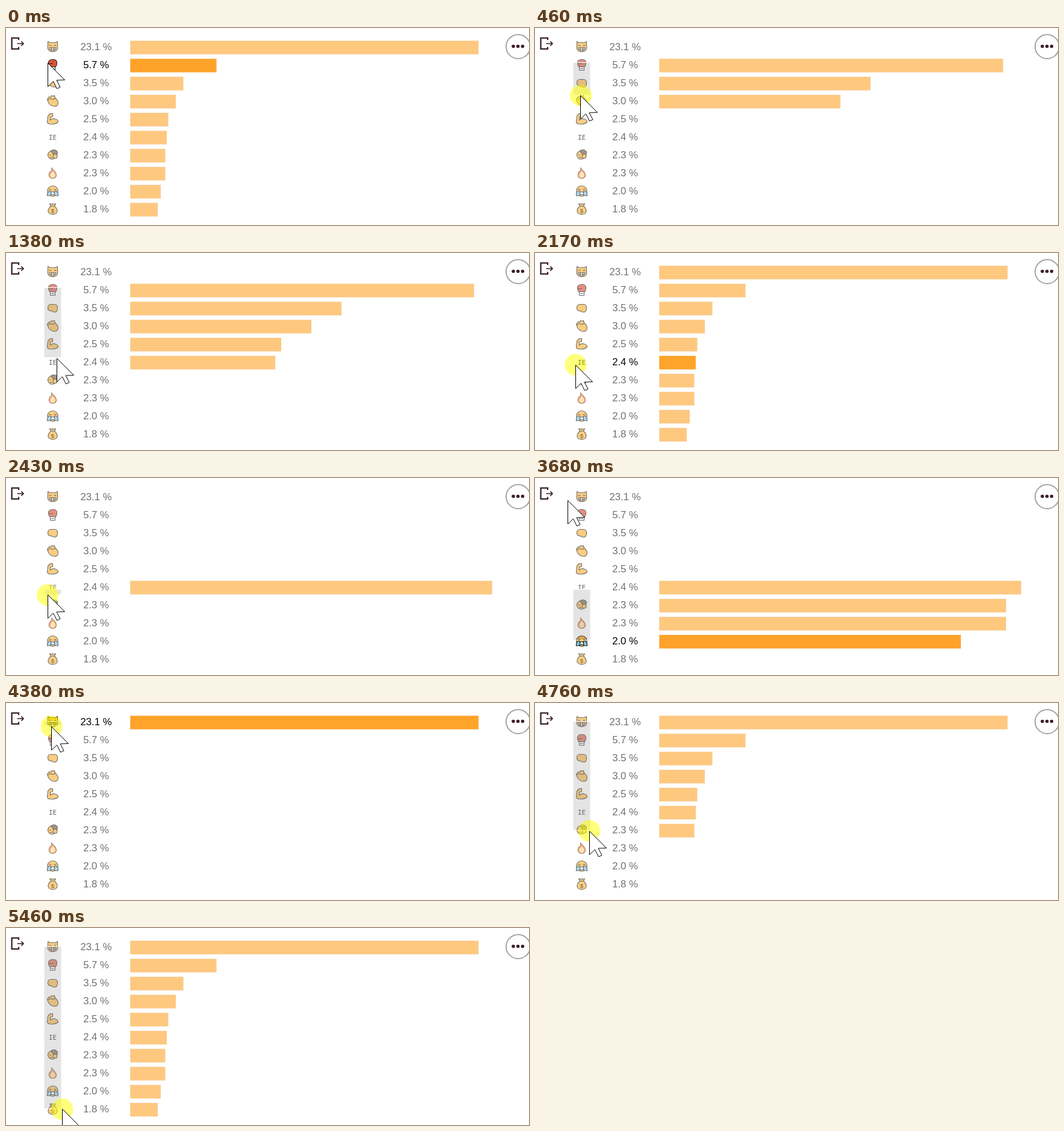
An HTML page that plays this animation: 868 by 328 pixels, repeating every 5540 ms.

```html
<!DOCTYPE html>
<html lang="en">
<head>
<meta charset="utf-8">
<title>Emoji share chart</title>
<style>
  html, body { margin: 0; width: 100%; height: 100%; overflow: hidden; background: #fff; }
  svg { display: block; width: 868px; height: 328px; }
  .bar { fill: #ffc87f; stroke: #f6d2a0; }
  .label { font: 16.7px "Liberation Sans", Arial, sans-serif; text-anchor: middle; fill: #707070; }
  .icon { opacity: .65; stroke: #222; stroke-width: 1.1; fill: none; stroke-linejoin: round; stroke-linecap: round; }
  .icon text { stroke: none; fill: #111; text-anchor: middle; }
  .code { font: 11px "DejaVu Sans Mono", monospace; }
  .coin { font: 9.5px "Liberation Sans", sans-serif; }
  .on .bar { fill: #ffa32a; stroke: #fbb558; }
  .on .label { fill: #000; }
  .on .icon { opacity: 1; }
  .icon .skin { fill: #fab33c; }
  .icon .white { fill: #fff; }
  .icon .red { fill: #d8553a; }
  .icon .blue { fill: #7cc6ec; }
  .icon .hair { fill: #7a5a3c; }
  .icon .fire { fill: #f0803a; stroke: #7a4a30; }
  .icon .glow { fill: #ffd98a; stroke: none; }
  #brush { fill: #777; fill-opacity: .2; stroke: #fff; }
  #press { fill: #ff0; fill-opacity: .52; }
  .ui { stroke: #3b2125; fill: none; }
  .dots { stroke: #3b2125; stroke-width: 5.6; stroke-linecap: round; stroke-dasharray: 0 7.7; }
</style>
</head>
<body>
<svg viewBox="0 0 868 328">
  <g class="ui">
    <path d="M21 20V16.6H9.6V34.9H21V31.5" stroke-width="2.3"/>
    <path d="M18.5 26H29M25.3 22.3L29 26L25.3 29.7" stroke-width="1.7"/>
  </g>
  <circle cx="850" cy="31" r="20" fill="#fff" stroke="#a5a5a5" stroke-width="2"/>
  <path class="dots" d="M842 30.5H858"/>
  <g id="rows"></g>
  <rect id="brush" x="63" width="29"/>
  <circle id="press" r="18"/>
  <path id="cursor" d="M0 0V39L9 30.5L15 42.5L20.5 40L14.5 28.5L28 28Z" fill="#fff" stroke="#000"/>
</svg>
<script>
const LOOP = 5540, STEP = 76, PITCH = 30, MID = 31.5;
const $ = id => document.getElementById(id);
const shape = (cls, d) => `<path class="${cls}" d="${d}"/>`;
const disc = (cls, r, x = 0, y = 0) => `<circle class="${cls}" r="${r}" cx="${x}" cy="${y}"/>`;
const eyes = shape('', 'M-5.5-2q1.5-2 3 0M2.5-2q1.5-2 3 0');
const grin = shape('white', 'M-5.5 1h11q-.5 5.5-5.5 5.5t-5.5-5.5z');

const icons = {
  cat: shape('skin', 'M-8-3V-9l4 2q4-1 8 0l4-2v6q2 11-8 11t-8-11z') + eyes + grin +
    shape('', 'M-5 3.5H5M-2 1v5M2 1v5'),
  glove: shape('white', 'M-4 3h8v6h-8z') +
    shape('red', 'M-5 3q-2-2-2-6 0-6 6-6h3q5 0 5 6 0 4-2 6z') +
    shape('', 'M-6-2h6M-2 6h4'),
  fist: shape('skin', 'M-8 0q0-6 5-6h6q5 0 5 6t-4 7q-4 0-6-2-6 0-6-5z'),
  clap: shape('skin', 'M-9-3l3-4 2 1 2-3 2 1 3-1 1 4q5 4 5 8 0 6-6 6-6 0-10-6z') +
    shape('', 'M-8-2q4-3 7-1 4 1 5-2'),
  arm: shape('skin', 'M-8-5l4-4h4v5l-4 1v5q4-4 8-2 5 1 5 5-4 4-12 3.500-6 0-6-4z'),
  code: '<text class="code" y="4.8">IE</text>',
  head: disc('skin', 7, -1) + shape('hair', 'M-3-7q7-4 11 2l-1 6-5-1z') + disc('skin', 3.5, 4, 2) +
    shape('', 'M-5 0h2M-4 4h3'),
  flame: shape('fire', 'M-2-9q2 3 5 6 4 4 3 8-2 4-6 4t-6-4q-1-5 3-8 2-2 1-6z') +
    shape('glow', 'M0-3q5 4 4 8-2 3-4 3t-4-3q0-4 4-8z'),
  tears: disc('skin', 8.8) + eyes +
    shape('blue', 'M-6 0h3v7l-6 1v-4zM6 0h-3v7l6 1v-4z') + shape('white', 'M-3 6q0-5 3-5t3 5z'),
  bag: shape('skin', 'M-3-5l-2-4 3 1 2-1 2 1 3-1-2 4q5 4 4.500 9-1 5-7.500 5t-7.500-5q-.5-5 4.500-9zh6') +
    '<text class="coin" y="6.500">$</text>'
};
const shares = [23.1, 5.7, 3.5, 3.0, 2.5, 2.4, 2.3, 2.3, 2.0, 1.8];

$('rows').innerHTML = Object.values(icons).map((icon, i) => `<g transform="translate(0 ${PITCH * i})">
  <rect class="bar" x="206.5" y="21.5" height="22"/>
  <text class="label" x="149.5" y="37">${shares[i].toFixed(1)} %</text>
  <g class="icon" transform="translate(77.5 ${MID})">${icon}</g></g>`).join('');
const rows = [...$('rows').children];

const home = [69, 58];
// Each move: start, end, x, y to reach
const moves = [
  [82, 720, 84, 175], [1710, 1862, 67.5, 186], [2246, 3000, 83, 271], [3280, 3660, 54.5, 37],
  [3910, 4138, 69, 31], [4214, 4366, 75.5, 39], [4366, 4596, 90, 213], [5080, 5580, 94, 317]
];
// Each drag: press, release
const drags = [[90, 1380], [2170, 3130], [4214, LOOP]];

// Eased pointer travel, sampled once per STEP
function pointer(t) {
  let [x, y] = home;
  for (const [from, to, nx, ny] of moves) {
    if (t < from) break;
    const u = Math.min(1, Math.floor((t - from) / STEP) * STEP / (to - from));
    const k = u * u * (3 - 2 * u);
    x += (nx - x) * k;
    y += (ny - y) * k;
  }
  return [x, y];
}

function rowAt([x, y]) {
  const i = Math.round((y - MID) / PITCH);
  const reach = i === 5 ? 6 : 9; // the text code is lower than the icons
  return x > 67 && x < 88 && Math.abs(y - MID - PITCH * i) <= reach ? i : -1;
}

// Round the axis end up to a clean multiple
function axisEnd(max) {
  const step = max > 10 ? 2 : max > 5 ? 1 : max > 2.5 ? .5 : .2;
  return Math.ceil(max / step - 1e-6) * step;
}

function draw(t) {
  const [x, y] = pointer(t);
  const [press, release] = drags.findLast(d => d[0] <= t) || [t, t];
  const held = t < release;
  const top = pointer(press)[1] - .5;
  const end = pointer(Math.min(t, release))[1] - 1;
  const brushed = end - top >= 1;
  const shown = shares.map((_, i) => !brushed || (end >= 20 + PITCH * i && top <= 45 + PITCH * i));
  const scale = 600 / axisEnd(Math.max(...shares.filter((_, i) => shown[i])));

  // After a release the last row stays lit until another is entered
  let hot = rowAt([x, y]);
  if (hot < 0 && !held) hot = rowAt(pointer(release));

  rows.forEach((row, i) => {
    const bar = row.firstElementChild;
    row.classList.toggle('on', i === hot);
    bar.setAttribute('visibility', shown[i] ? 'visible' : 'hidden');
    bar.setAttribute('width', shares[i] * scale);
  });
  $('brush').setAttribute('y', top);
  $('brush').setAttribute('height', brushed ? end - top : 0);
  $('press').setAttribute('visibility', held ? 'visible' : 'hidden');
  $('press').setAttribute('transform', `translate(${x} ${y})`);
  $('cursor').setAttribute('transform', `translate(${Math.floor(x) + .5} ${Math.floor(y) + .5})`);
}

const start = performance.now();
function frame() {
  draw((performance.now() - start) % LOOP);
  requestAnimationFrame(frame);
}
frame();
</script>
</body>
</html>
```
